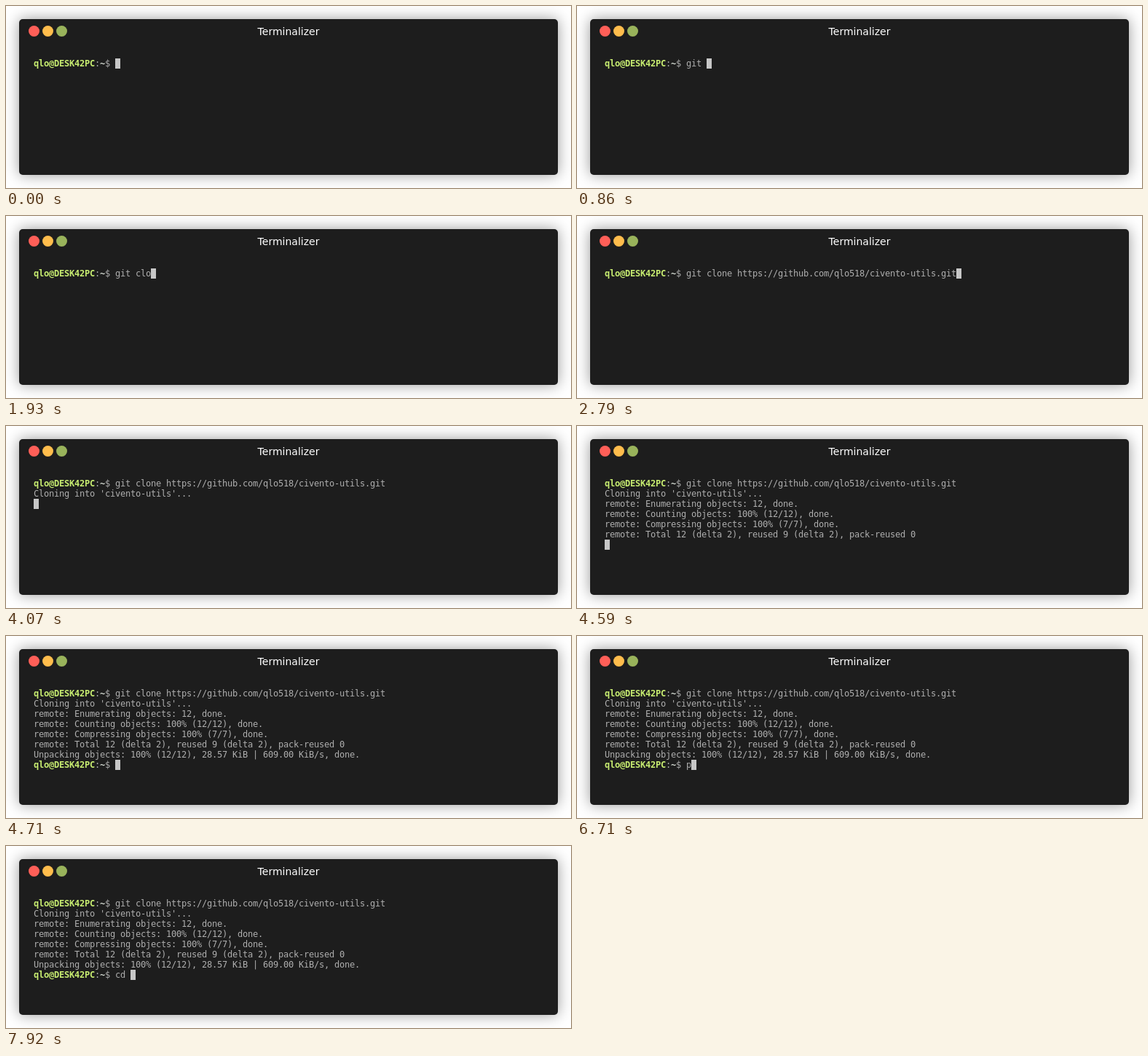
Write an HTML page that moves like this. It is 776x250 px and loops after 8000 ms.

```html
<!DOCTYPE html>
<html lang="en">
<head>
<meta charset="utf-8">
<title>Terminal</title>
<style>
  html, body { margin: 0; width: 100%; height: 100%; overflow: hidden; background: #fff; }
  #window {
    position: absolute; left: 18px; top: 18px; width: 740px; height: 214px;
    border-radius: 5px; background: #1d1d1d; box-shadow: 0 0 20px rgba(0, 0, 0, .4);
  }
  .dot { position: absolute; top: 9px; width: 15px; height: 15px; border-radius: 50%; }
  #title {
    position: absolute; top: 9px; width: 100%; text-align: center; color: #fff;
    font: 14px/16px "DejaVu Sans", sans-serif;
  }
  #screen {
    position: absolute; left: 20px; top: 54px; color: #afafaf;
    font: 12px/14px "DejaVu Sans Mono", monospace;
  }
  .row { display: flex; height: 14px; }
  .row span { width: 7px; height: 14px; white-space: pre; }
  .row .user { color: #c8ed71; font-weight: bold; }
  .row .path { color: #d3d9d2; font-weight: bold; }
  .row .cursor { background: #c7c7c7; color: #1d1d1d; }
</style>
</head>
<body>
<div id="window">
  <div class="dot" style="left:13px;background:#ff5f58"></div>
  <div class="dot" style="left:32px;background:#ffbd4c"></div>
  <div class="dot" style="left:51px;background:#99b35b"></div>
  <div id="title">Terminalizer</div>
  <div id="screen"></div>
</div>
<script>
const LOOP = 8000;
const USER = "qlo@DESK42PC";
const PROMPT = USER + ":~$ ";

// Terminal output: [time in ms, characters written]
const output = [
  [0, PROMPT],
  [500, "g"], [605, "i"], [710, "t"], [860, " "],
  [1510, "c"], [1720, "l"], [1930, "o"], [2180, "n"], [2370, "e"], [2520, " "],
  [2790, "https://github.com/qlo518/civento-utils.git"],
  [4070, "\nCloning into 'civento-utils'...\n"],
  [4460, "remote: Enumerating objects: 12, done.\n" +
         "remote: Counting objects: 100% (12/12), done.\n" +
         "remote: Compressing objects: 100% (7/7), done.\n"],
  [4560, "remote: Total 12 (delta 2), reused 9 (delta 2), pack-reused 0\n"],
  [4610, "Unpacking objects:  41% (5/12)\r"],
  [4660, "Unpacking objects: 100% (12/12), 28.57 KiB | 609.00 KiB/s, done.\n"],
  [4710, PROMPT],
  [6710, "p"], [7400, "\b \b"],
  [7610, "c"], [7760, "d"], [7920, " "]
];

const screen = document.getElementById("screen");

function interpret(text) {
  const rows = [[]];
  let col = 0;
  for (const char of text) {
    if (char === "\n") { rows.push([]); col = 0; }
    else if (char === "\r") col = 0;
    else if (char === "\b") col--;
    else rows[rows.length - 1][col++] = char;
  }
  return { rows, col };
}

function cellStyle(isPrompt, col) {
  if (!isPrompt) return "";
  if (col < USER.length) return "user";
  return col === USER.length + 1 ? "path" : "";
}

function render(text) {
  const { rows, col } = interpret(text);
  const cursorRow = rows[rows.length - 1];
  cursorRow[col] ??= " ";
  screen.replaceChildren(...rows.map(row => {
    const line = document.createElement("div");
    const isPrompt = row.join("").startsWith(PROMPT);
    line.className = "row";
    row.forEach((char, i) => {
      const cell = document.createElement("span");
      cell.textContent = char;
      cell.className = row === cursorRow && i === col ? "cursor" : cellStyle(isPrompt, i);
      line.append(cell);
    });
    return line;
  }));
}

let shown = 0;
function draw() {
  const time = performance.now() % LOOP;
  const written = output.filter(([start]) => start <= time);
  if (written.length !== shown) {
    shown = written.length;
    render(written.map(([, text]) => text).join(""));
  }
  requestAnimationFrame(draw);
}
draw();
</script>
</body>
</html>
```
